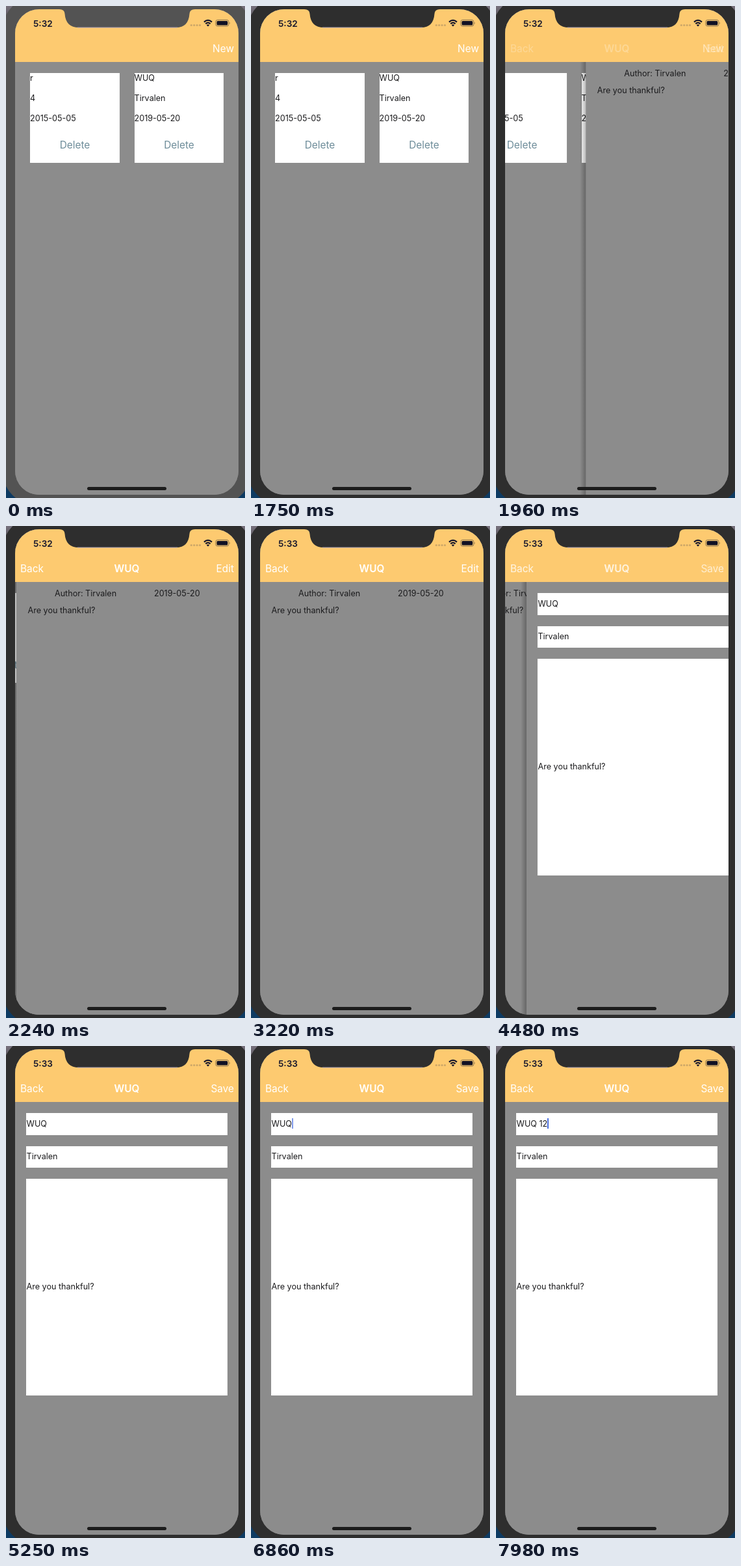
Animation of 368x756 px, one loop 8 s. Source, as an HTML page:

```html
<!DOCTYPE html>
<html lang="en">
<head>
<meta charset="utf-8">
<title>Notes app</title>
<style>
  html, body { margin: 0; width: 100%; height: 100%; overflow: hidden; }
  body { position: relative; background: linear-gradient(#77717c 0, #3c3c42 40px, #0d3a62 720px); }
  div, span.t, svg { position: absolute; }
  #bezel { left: -5px; top: -14px; width: 382px; height: 780px; border-radius: 50px; }
  #screen { left: 14px; top: 5px; width: 344px; height: 746px; border-radius: 37px; overflow: hidden; background: #8c8c8c; }
  .stage { left: -14px; top: -5px; width: 368px; height: 756px; }
  .page { left: 14px; top: 0; width: 344px; height: 756px; background: #8c8c8c; }
  .page > .in { left: -14px; top: 0; width: 368px; height: 756px; }
  .shade { left: -9px; top: 0; width: 9px; height: 756px; background: linear-gradient(90deg, #0000, #0004); }
  #bar { left: 0; top: 0; width: 368px; height: 85.5px; background: #fdca70; }
  .nav { left: 0; top: 0; width: 368px; height: 86px; color: #fff; }
  .box { background: #fff; }
  .t { font: 12.6px/20px Inter, "Open Sans", sans-serif; color: #1b1b1d; white-space: pre; }
  .nav .t, .del { font-size: 15.4px; }
  .nav .t { color: inherit; }
  .nav .title { font-weight: 600; }
  .t.del { color: #6d8c99; }
  .t.clock { font-size: 13.6px; font-weight: 600; color: #17172c; }
  .mid { transform: translateX(-50%); }
  #caret { display: inline-block; position: relative; width: 2px; height: 16px; margin-right: -2px; vertical-align: -3px; background: #4a6fe0; }
  #home { left: 125px; top: 739px; width: 122px; height: 4.5px; border-radius: 3px; background: #1c1c1c; }
  svg { left: 0; top: 0; }
</style>
</head>
<body>
<div id="bezel"></div>
<div id="screen"><div class="stage" id="stage"></div></div>
<svg width="368" height="756" viewBox="0 0 368 756">
  <path id="notch" d="M82 4V5Q90 5 90.5 12Q92 33 112 33H262Q281 33 282.5 12Q283 5 291 5V4Z"/>
  <path d="M110 33H264" stroke="#a09ab4" stroke-width="1"/>
  <g fill="#cda768">
    <circle cx="285.3" cy="29.5" r="1.6"/><circle cx="289.7" cy="29.5" r="1.6"/>
    <circle cx="294.1" cy="29.5" r="1.6"/><circle cx="298.5" cy="29.5" r="1.6"/>
  </g>
  <g fill="none" stroke="#15152b" stroke-width="2.2">
    <path d="M305 24.6Q311 19 317 24.6"/><path d="M307.4 27.4Q311 24 314.6 27.4"/>
  </g>
  <path d="M308.8 29.2Q311 27.4 313.2 29.2L311 31.6Z" fill="#15152b"/>
  <rect x="322.9" y="21.4" width="20" height="9.6" rx="2.8" fill="none" stroke="#8b7550"/>
  <rect x="324.5" y="23" width="16.8" height="6.4" rx="1.5" fill="#111124"/>
  <path d="M344 24.4Q345.8 26.2 344 28Z" fill="#8b7550"/>
</svg>
<script>
const TITLE = 'WUQ', AUTHOR = 'Tirvalen', NOTE = 'Are you thankful?';
const LOOP = 8000, TICK = 70, WIDTH = 344;
const $ = id => document.getElementById(id);

const text = (x, cy, s, cls = '') =>
  `<span class="t ${cls}" style="left:${x}px;top:${cy - 10}px">${s}</span>`;
const right = (cy, s) =>
  `<span class="t" style="right:17px;top:${cy - 10}px">${s}</span>`;
const box = (x, y, w, h) =>
  `<div class="box" style="left:${x}px;top:${y}px;width:${w}px;height:${h}px"></div>`;
const card = (x, rows) => box(x, 103, 137.5, 138) +
  rows.map((s, i) => text(x, 111 + 31 * i, s)).join('') +
  text(x + 69, 213.5, 'Delete', 'del mid');
const page = (id, body) =>
  `<div class="page" id="${id}"><div class="shade"></div><div class="in">${body}</div></div>`;
const nav = (id, action, inner) => `<div class="nav" id="${id}">` +
  (inner ? `<div id="${id}Main">${text(22, 66, 'Back')}${text(186, 65.5, TITLE, 'title mid')}</div>` : '') +
  `<div id="${id}Act" style="left:0;width:368px">${right(66, action)}</div></div>`;

$('stage').innerHTML =
  page('list', card(37, ['r', '4', '2015-05-05']) + card(197.5, [TITLE, AUTHOR, '2019-05-20'])) +
  page('detail', text(73, 104, 'Author: ' + AUTHOR) + text(226, 104, '2019-05-20') + text(31.5, 130, NOTE)) +
  page('edit', box(31, 103, 310, 33.5) + box(31, 153.5, 310, 33.5) + box(31, 204, 310, 332.5) +
    text(31.5, 119.5, '<span id="typed"></span><span id="caret"></span>') +
    text(31.5, 170, AUTHOR) + text(31.5, 370, NOTE)) +
  '<div id="bar"></div>' +
  nav('navList', 'New') + nav('navDetail', 'Edit', true) + nav('navEdit', 'Save', true) +
  text(42, 26.5, '<span id="clock"></span>', 'clock') + '<div id="home"></div>';

const PUSH = [1841, 4264];
const TYPED = [[0, ''], [7140, ' '], [7350, ' 1'], [7770, ' 12']];
const CARET = [[0, 0], [5600, .5], [5670, 1], [5810, .7], [5880, .35], [5950, 0],
  [6230, .35], [6300, .7], [6370, 1], [6860, .7], [6930, .35], [7000, 0], [7140, 1]];

const at = (steps, t) => steps.filter(s => s[0] <= t).pop()[1];
const clamp = v => Math.min(1, Math.max(0, v));

// critically damped spring, settled after half a second
function slide(ms) {
  if (ms <= 0) return 0;
  if (ms >= 500) return 1;
  const u = ms * .01826;
  return 1 - (1 + u) * Math.exp(-u);
}
function fade(ms) {
  const u = clamp(ms / 350);
  return u * u * (3 - 2 * u);
}

function place(id, enter, leave) {
  const el = $(id);
  el.style.visibility = enter > 0 && leave < 1 ? 'visible' : 'hidden';
  el.style.transform = `translateX(${WIDTH * (1 - enter) - .3 * WIDTH * leave}px)`;
  el.firstChild.style.opacity = enter < 1 ? 1 : 0;
}

function draw(t) {
  const [a, b] = PUSH.map(p => slide(t - p));
  place('list', 1, a);
  place('detail', a, b);
  place('edit', b, 0);

  const [fa, fb] = PUSH.map(p => fade(t - p));
  $('navListAct').style.opacity = (1 - fa) ** 2;
  $('navDetailMain').style.opacity = fa * (1 - fb);
  $('navDetailAct').style.opacity = fa * (1 - fb) ** 2;
  $('navEdit').style.opacity = fb;

  const c = Math.round(83 - 37 * clamp((t - 560) / 770));
  $('bezel').style.background = $('notch').style.fill = `rgb(${c},${c},${c})`;
  $('clock').textContent = t < 2660 ? '5:32' : '5:33';
  $('typed').textContent = TITLE + at(TYPED, t);
  $('caret').style.opacity = at(CARET, t);
}

function frame() {
  const t = performance.now() % LOOP;
  draw(Math.floor(t / TICK) * TICK);
  requestAnimationFrame(frame);
}
frame();
</script>
</body>
</html>
```
